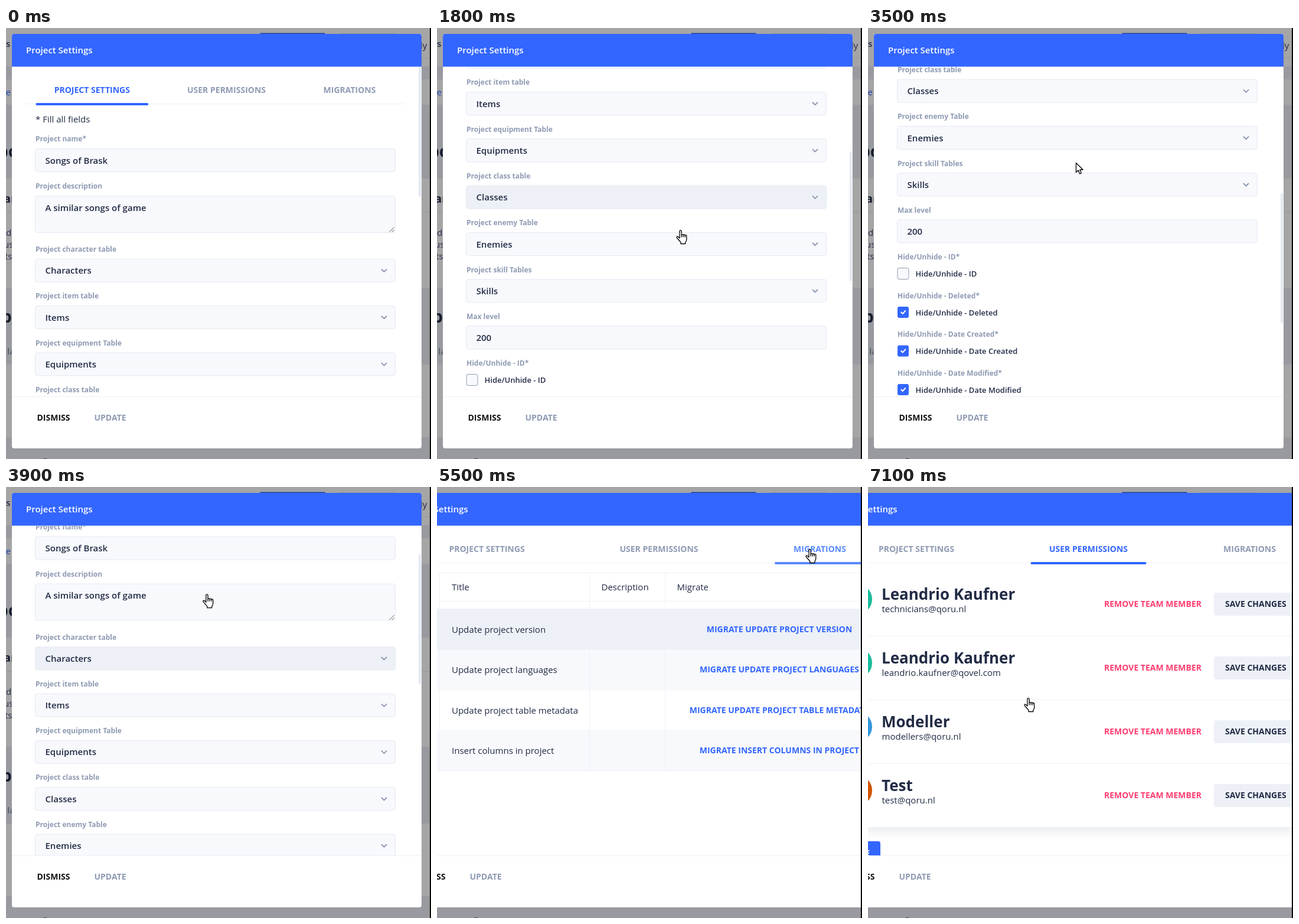
An HTML page that plays this animation: 720 px wide and 730 px high, repeating every 7200 ms.

```html
<!DOCTYPE html>
<html lang="en">
<head>
<meta charset="utf-8">
<title>Project Settings</title>
<style>
html, body { margin: 0; width: 100%; height: 100%; overflow: hidden; background: #989a9f; }
svg { display: block; font: 15px "Open Sans", sans-serif; }
text { fill: #222b45; white-space: pre; }
.field { font-weight: 600; }
.label { font-size: 12px; font-weight: 700; fill: #8f9bb3; }
.check { font-size: 13px; font-weight: 600; }
.caps { font-size: 14px; font-weight: 700; }
.muted { fill: #8f9bb3; }
.name { font-size: 26px; font-weight: 700; }
.big { font-size: 28px; font-weight: 700; fill: #171d2e; }
.blue { fill: #3366ff; }
.red { fill: #ff3d71; }
.white { fill: #fff; }
.box { fill: #f7f9fc; stroke: #e4e9f2; }
.box.hover { fill: #edf1f7; }
.line { stroke: #edf1f7; fill: none; }
.icon { fill: none; stroke: #8f9bb3; stroke-width: 2; stroke-linecap: round; stroke-linejoin: round; }
</style>
</head>
<body>
<svg id="stage" width="720" height="730" viewBox="0 0 720 730"></svg>
<script>
const LOOP = 7200, TOP = 66, BOTTOM = 624;
const text = (x, y, str, cls = '', attr = '') => `<text x="${x}" y="${y}" class="${cls}" ${attr}>${str}</text>`;
const rect = (x, y, w, h, attr) => `<rect x="${x}" y="${y}" width="${w}" height="${h}" ${attr}/>`;
const path = (d, attr = 'class="line"') => `<path d="${d}" ${attr}/>`;
const each = (list, fn) => list.map(fn).join('');

const selects = [];
function input(y, value, x = 49.5, h = 39) {
  return rect(x, y, 659.5 - x, h, 'rx="4" class="box"') + text(x + 17, y + 25, value, 'field');
}
function select(y, value, x) {
  selects.push(y);
  return `<g class="select">${input(y, value, x)}${path(`M636.5 ${y + 17.7}l4 4 4-4`, 'class="icon"')}</g>`;
}

function settingsForm() {
  const tables = [['character table', 'Characters'], ['item table', 'Items'], ['equipment Table', 'Equipments'],
    ['class table', 'Classes'], ['enemy Table', 'Enemies'], ['skill Tables', 'Skills']];
  return text(50, 160, '* Fill all fields') +
    text(50, 192, 'Project name*', 'label') + input(204.5, 'Songs of Brask') +
    text(50, 272, 'Project description', 'label') + input(284.5, 'A similar songs of game', 49.5, 62) +
    path('M649.5 345.5l8-8M654 345.5l3.5-3.5', 'stroke="#555"') +
    each(tables, ([label, value], i) => {
      const y = 391.3 + i * 79.3;
      return text(50, y - 12.3, 'Project ' + label, 'label') + select(y, value);
    }) +
    text(50, 855, 'Max level', 'label') + input(866.8, '200') +
    each(['ID', 'Deleted', 'Date Created', 'Date Modified'], (what, i) => {
      const y = 948.5 + i * 65.5, on = i > 0;
      return text(50, y - 14.5, `Hide/Unhide - ${what}*`, 'label') +
        rect(50, y, 19, 19, on ? 'rx="3" fill="#3366ff"' : 'rx="3" fill="#f7f9fc" stroke="#8f9bb3"') +
        (on ? path(`M56.3 ${y + 9.5}l2.4 2.5 4.6-5`, 'class="icon" style="stroke:#fff"') : '') +
        text(80.5, y + 14.5, 'Hide/Unhide - ' + what, 'check');
    }) +
    each(['German', 'English', 'Spanish', 'French'], (lang, i) => {
      const y = 1184.5 + i * 55.5;
      return text(50, y + 11.5, 'Language', 'label') + text(50, y + 27, i + 1 + '*', 'label') + select(y, lang, 115.5);
    }) +
    rect(50, 1406, 167, 40, 'rx="4" fill="#00d68f"');
}

function teamList() {
  const team = [['Leandrio Kaufner', 'technicians@qoru.nl', '#1abc9c'],
    ['Leandrio Kaufner', 'leandrio.kaufner@qovel.com', '#1abc9c'],
    ['Modeller', 'modellers@qoru.nl', '#3498db'], ['Test', 'test@qoru.nl', '#d35400']];
  return rect(0, 576, 720, 22, 'fill="url(#shade)"') +
    each(team, ([name, mail, color], i) => {
      const y = 144 + i * 108;
      return `<circle cx="-19" cy="${y + 46}" r="26" fill="${color}"/>` +
        text(23, y + 46.5, name, 'name') + text(23.5, y + 68, mail) +
        text(400, y + 59, 'REMOVE TEAM MEMBER', 'caps red') +
        rect(586, y + 35, 160, 39, 'rx="4" fill="#edf1f7"') + text(605, y + 59, 'SAVE CHANGES', 'caps') +
        path(`M0 ${y + 108.5}H720`);
    }) +
    rect(-90, 600, 111, 40, 'rx="4" fill="#3366ff"') + text(3, 625, 'E', 'caps white', 'text-anchor="end"');
}

function migrationTable() {
  const rows = ['Update project version', 'Update project languages', 'Update project table metadata', 'Insert columns in project'];
  return text(25, 175, 'Title') + text(278.5, 175, 'Description') + text(406.5, 175, 'Migrate') +
    each(rows, (row, i) => {
      const y = 207 + i * 68.4;
      return rect(0, y, 720, 68.4, `fill="${['#edf1f7', '#f7f9fc', '#fff', '#f7f9fc'][i]}"`) +
        path(`M0 ${y + 68.4}H720`) + text(25, y + 39.7, row) +
        text(580, y + 39, 'MIGRATE ' + row.toUpperCase(), 'caps blue', 'text-anchor="middle"');
    }) +
    path('M4.5 145.5H720M4.5 193.5H720M0 206.5H720M4.5 145V480M258.5 145V480M386.5 145V480');
}

function backdrop() {
  const panels = [[0, 65], [87, 43], [255, 185], [570, 123]];
  return rect(0, 0, 720, 730, 'fill="#989a9f"') +
    each(panels, ([y, h]) => rect(0, y, 720, h, 'fill="#a5a5a6"')) +
    path('M0 312.5H720M704 50.5H720M565 9.5H660', 'stroke="#96989d"') +
    rect(430, 8.5, 111, 4, 'rx="2" fill="#213f9e"') +
    text(0, 32, 's', 'field') + text(8, 114, 'here', '', 'text-anchor="end" style="fill:#2143a8"') +
    text(-14, 219, 'po', 'big') + text(-4, 296, 'an', 'big', 'style="font-size:20px"') +
    text(0, 352, 'de') + text(-4, 372, 'us') + text(-2, 392, 'ts,') +
    text(-8, 499, 'b', 'big') + text(2, 553, 'la', 'caps', 'style="fill:#5d6575"') +
    text(702, 35, 'ly') + rect(64, 729, 5, 1, 'fill="#444"');
}

const tabNames = ['PROJECT SETTINGS', 'USER PERMISSIONS', 'MIGRATIONS'];
const tabWidths = [191, 196, 153];
// Per view: modal left edge, modal width and tab centres.
const views = [
  { left: 10, width: 694, tabs: [145.8, 373.5, 582] },
  { left: -87, width: 888, tabs: [82, 373.5, 646.5] },
  { left: -84, width: 882, tabs: [84.5, 376, 648.5] }
];

const stage = document.getElementById('stage');
stage.innerHTML = `<defs>
  <clipPath id="body">${rect(0, TOP, 720, BOTTOM - TOP, '')}</clipPath>
  <linearGradient id="shade" x2="0" y2="1">
    <stop stop-color="#edeef1"/><stop offset=".5" stop-color="#f7f8f9"/><stop offset="1" stop-color="#fff"/>
  </linearGradient>
</defs>` + backdrop() +
  rect(0, 10, 0, 702, 'id="card" rx="4" fill="#fff"') +
  `<g clip-path="url(#body)"><g id="scroll">
    <path id="rule" class="line"/>
    ${each(tabNames, n => `<g class="tab">${text(0, 110, n, 'caps', 'text-anchor="middle"')}<rect y="127" height="4" rx="2"/></g>`)}
    <g class="view">${settingsForm()}</g><g class="view">${teamList()}</g><g class="view">${migrationTable()}</g>
  </g></g>` +
  rect(699, 0, 4, 220, 'id="thumb" rx="2" fill="#e4e9f2"') +
  path('M0 0', 'id="head" fill="#3366ff"') + path('M0 0', 'id="foot" class="line"') +
  `<g id="fixed">${text(24, 43, 'Project Settings', 'field white')}
    ${text(42.5, 665, 'DISMISS', 'caps', 'style="fill:#111"')}${text(139.5, 665, 'UPDATE', 'caps muted')}</g>` +
  rect(718, 0, 2, 730, 'fill="#000"') +
  `<g id="pointer" fill="#fff" stroke="#000" stroke-width="1.3" stroke-linejoin="round">
    ${path('M.5.5V16.5L4.2 13l2.6 6 2.6-1.1L6.9 12h5.2z', 'id="arrow"')}
    <g id="hand" transform="translate(-7)">
      ${path('M6 14V2.2a1.6 1.6 0 0 1 3.2 0V9a1.5 1.5 0 0 1 3 .2a1.5 1.5 0 0 1 3 .6a1.3 1.3 0 0 1 2.6.8V16q0 3-2 5v2.5H8V21Q4.5 17 1.2 13q-.6-2 1.4-2Q4.5 12 6 14z', '')}
      ${path('M9.2 9v3.5M12.2 9.2v3.3M15.2 9.8v2.7', '')}
    </g></g>`;

const $ = id => document.getElementById(id);
const all = cls => [...stage.querySelectorAll('.' + cls)];
const set = (el, attrs) => Object.entries(attrs).forEach(([k, v]) => el.setAttribute(k, v));
const show = (el, on) => { el.style.display = on ? '' : 'none'; };
const tabEls = all('tab'), viewEls = all('view'), selectEls = all('select');

// Keys are [time, ...values].
const scrollKeys = [[1000, 0], [1800, 362], [2400, 793], [2900, 793], [3350, 542], [3550, 542], [4000, 0]];
const pointerKeys = [[400, 440, 740], [1000, 412, 342], [1800, 412, 342], [2400, 398, 369], [3300, 352, 228], [3550, 352, 228],
  [4300, 325, 124], [4850, 325, 124], [5300, 631, 105], [5750, 631, 105], [6150, 372, 106], [6400, 372, 106], [7100, 271, 357]];
const smooth = u => u * u * (3 - 2 * u);
function track(keys, t, ease = u => u) {
  const i = keys.findIndex(k => k[0] >= t);
  if (i < 0) return keys[keys.length - 1].slice(1);
  if (!i) return keys[0].slice(1);
  const [t0, ...a] = keys[i - 1], [t1, ...b] = keys[i], u = ease((t - t0) / (t1 - t0));
  return a.map((v, j) => v + (b[j] - v) * u);
}

function draw(t) {
  const view = t < 4500 ? 0 : t < 5300 ? 1 : t < 6200 ? 2 : 1;
  const { left, width, tabs } = views[view];
  const [scroll] = track(scrollKeys, t), [x, y] = track(pointerKeys, t, smooth);
  const right = left + width;

  set($('card'), { x: left, width });
  set($('head'), { d: `M${left} 65.5V14q0-4 4-4H${right - 4}q4 0 4 4V65.5z` });
  set($('foot'), { d: `M${left} 624.5H${right}` });
  set($('fixed'), { transform: `translate(${left})` });
  set($('scroll'), { transform: `translate(0 ${-scroll})` });
  set($('rule'), { d: `M${left + 25} 128.5H${right - 29}` });
  set($('thumb'), { y: TOP + scroll * 0.395 });
  show($('thumb'), view === 0);
  viewEls.forEach((el, i) => show(el, i === view));

  let hot = view > 0;
  tabEls.forEach((el, i) => {
    const w = tabWidths[i], [label, bar] = el.children;
    const over = Math.abs(x - tabs[i]) < w / 2 && y + scroll > 82 && y + scroll < 131;
    const fill = over ? '#598bff' : i === view ? '#3366ff' : '#8f9bb3';
    hot = hot || over;
    label.style.fill = fill;
    set(label, { x: tabs[i] });
    set(bar, { x: tabs[i] - w / 2, width: w, fill });
    show(bar, over || i === view);
  });

  // Hover follows the scroll position one step late.
  const pageY = y + track(scrollKeys, t - 100)[0];
  selectEls.forEach((el, i) => {
    const over = view === 0 && pageY > selects[i] && pageY < selects[i] + 39;
    hot = hot || over;
    el.firstChild.classList.toggle('hover', over);
  });

  set($('pointer'), { transform: `translate(${x} ${y})` });
  show($('pointer'), t > 400);
  show($('hand'), hot);
  show($('arrow'), !hot);
}

const start = performance.now();
function tick() {
  const t = (performance.now() - start) % LOOP;
  draw(Math.floor(t / 100) * 100);
  requestAnimationFrame(tick);
}
tick();
</script>
</body>
</html>
```
